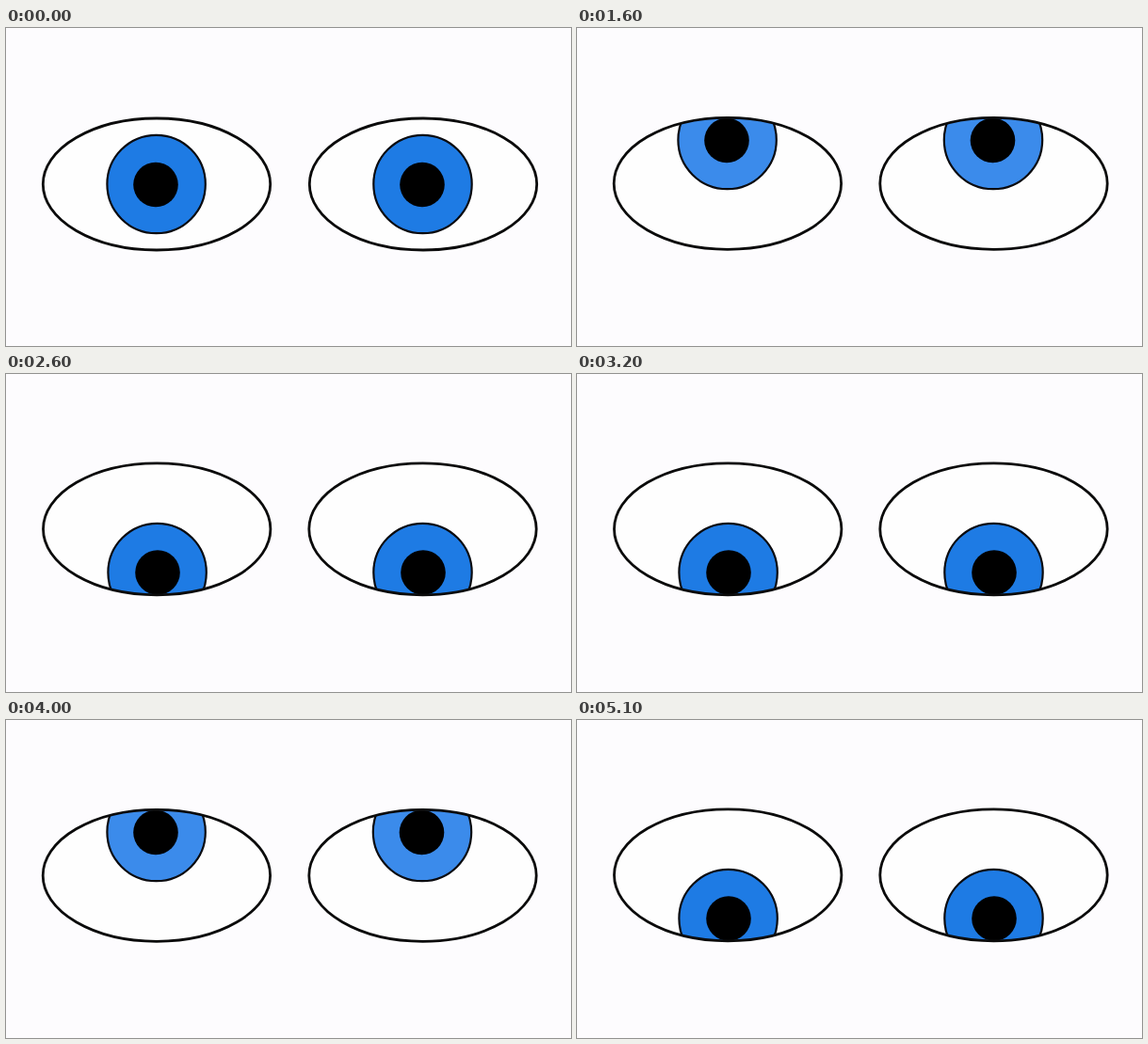
Write an HTML page that moves like this. It is 600 by 338 pixels and loops after 5.2 s.

```html
<!DOCTYPE html>
<html lang="en">
<head>
<meta charset="utf-8">
<title>Eyes looking up and down</title>
<style>
  html, body { margin: 0; width: 100%; height: 100%; overflow: hidden; background: #fdfcfe; }
  svg { display: block; width: 100vw; height: 100vh; }
</style>
</head>
<body>
<svg id="stage" viewBox="0 0 600 338" preserveAspectRatio="none"></svg>
<script>
const LOOP = 5200, REST = 1000, TICK = 100, BEATS_PER_SECOND = 3;
const RX = 120.7, RY = 70;

// eyes: [eye x, iris x, pupil x] for the left and right eye
const poses = {
  center: { eyeY: 166, irisY: 166, pupilY: 166.5, blue: '#1e7be4',
            eyes: [[160, 159.6, 159], [443, 442.5, 442]] },
  up:     { eyeY: 165.3, irisY: 119, pupilY: 119.5, blue: '#3b8beb',
            eyes: [[159.9, 159.6, 159], [442.5, 442, 441.5]] },
  down:   { eyeY: 164.8, irisY: 211, pupilY: 211, blue: '#1e7be4',
            eyes: [[160.2, 160.6, 161], [442.5, 442.5, 443]] }
};

function drawEye(name, pose, [eyeX, irisX, pupilX], side) {
  const id = `${name}-${side}`;
  const lid = `<ellipse cx="${eyeX}" cy="${pose.eyeY}" rx="${RX}" ry="${RY}"`;
  return `<clipPath id="${id}">${lid}/></clipPath>
    ${lid} fill="#fefefe"/>
    <g clip-path="url(#${id})">
      <circle cx="${irisX}" cy="${pose.irisY}" r="52.2" fill="${pose.blue}" stroke="#0b0b0f" stroke-width="2.2"/>
      <circle cx="${pupilX}" cy="${pose.pupilY}" r="23.8" fill="#000"/>
    </g>
    ${lid} fill="none" stroke="#0b0b0b" stroke-width="2.8"/>`;
}

const stage = document.getElementById('stage');
stage.innerHTML = Object.entries(poses).map(([name, pose]) =>
  `<g id="${name}">${pose.eyes.map((eye, side) => drawEye(name, pose, eye, side)).join('')}</g>`
).join('');

function poseAt(time) {
  const t = Math.floor(time / TICK) * TICK;
  if (t < REST) return 'center';
  const beat = Math.floor((t - REST) * BEATS_PER_SECOND / 1000);
  return beat % 2 ? 'up' : 'down';
}

function show(time) {
  const current = poseAt(time);
  for (const name in poses) {
    document.getElementById(name).style.display = name === current ? '' : 'none';
  }
}

const start = performance.now();
function frame() {
  show((performance.now() - start) % LOOP);
  requestAnimationFrame(frame);
}
frame();
</script>
</body>
</html>
```
